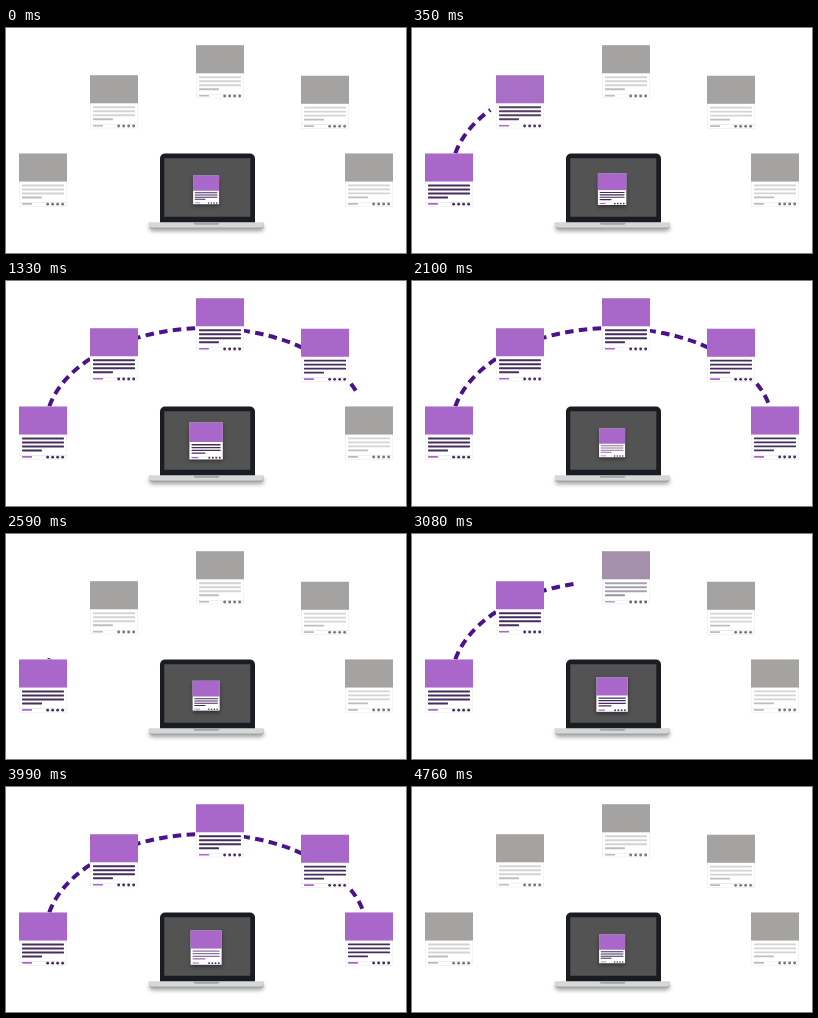
Animation, 400 px wide and 225 px high, one loop 4830 ms. Source, as an HTML page with a canvas:

```html
<!DOCTYPE html>
<html lang="en">
<head>
<meta charset="utf-8">
<title>Cards around a laptop</title>
<style>
html, body { margin: 0; width: 100%; height: 100%; overflow: hidden; background: #fff; }
canvas { display: block; width: 400px; height: 225px; }
</style>
</head>
<body>
<canvas id="stage"></canvas>
<script>
const LOOP = 4830, STEP = 70;
const canvas = document.getElementById('stage');
const ctx = canvas.getContext('2d');
const ratio = window.devicePixelRatio || 1;
canvas.width = 400 * ratio;
canvas.height = 225 * ratio;

// x, y and the time at which each card starts to gain colour
const CARDS = [
  [13, 125.5, -135], [84, 47.3, 178], [190, 17.3, 592], [295, 47.7, 965], [339, 125.4, 1335]
];
// time and angle of the tip of the dashed arc
const TIP = [[70, 0], [370, 0.76], [645, 1.336], [700, 1.43], [925, 1.82], [1330, 2.765], [1560, Math.PI]];

const GREY = { head: [165, 163, 161], line: [212, 212, 212], short: [190, 190, 190], label: [188, 188, 188], dot: [122, 122, 122] };
const PURPLE = { head: [169, 104, 201], line: [68, 46, 92], short: [68, 46, 92], label: [169, 104, 201], dot: [72, 46, 98] };
const PALE = { ...PURPLE, line: [140, 115, 160], short: [140, 115, 160] };

const ramp = (t, from, to) => Math.min(1, Math.max(0, (t - from) / (to - from)));
const ease = p => (1 - Math.cos(Math.PI * p)) / 2;
const mix = (a, b, p) => `rgb(${a.map((v, i) => Math.round(v + (b[i] - v) * p))})`;

function rect(x, y, w, h, fill, radius = 0) {
  ctx.fillStyle = fill;
  ctx.beginPath();
  ctx.roundRect(x, y, w, h, radius);
  ctx.fill();
}

function shadow(color, blur, dy) {
  ctx.shadowColor = color;
  ctx.shadowBlur = blur * ratio;
  ctx.shadowOffsetY = dy * ratio;
}

function card(x, y, scale, from, to, p) {
  const tone = part => mix(from[part], to[part], p);
  ctx.save();
  ctx.translate(x, y);
  ctx.scale(scale, scale);
  rect(0, 0, 48, 53, '#e9e9e9');
  shadow('transparent', 0, 0);
  rect(0.5, 28, 47, 24.5, '#fff');
  rect(0.5, 48.6, 47, 0.6, '#e6e6e6');
  rect(0, 0, 48, 28, tone('head'));
  for (let i = 0; i < 3; i++) rect(3, 31 + i * 4, 42, 1.9, tone('line'), 0.6);
  rect(3, 43, 20, 1.9, tone('short'), 0.6);
  rect(3, 49.6, 10, 1.7, tone('label'), 0.4);
  for (let i = 0; i < 4; i++) rect(27.2 + i * 5, 49.2, 2.9, 2.9, tone('dot'), 1.45);
  ctx.restore();
}

function arc(t) {
  let angle = 0;
  TIP.slice(1).forEach(([end, to], i) => {
    const [start, from] = TIP[i];
    angle += (to - from) * ramp(t, start, end);
  });
  if (!angle) return;
  ctx.strokeStyle = '#4c128c';
  ctx.lineWidth = 4;
  ctx.setLineDash([8.5, 5.3]);
  ctx.lineDashOffset = -8.2;
  ctx.beginPath();
  ctx.ellipse(200.5, 147, 161, 100, 0, Math.PI, Math.PI + angle);
  ctx.stroke();
}

function laptop(t) {
  ctx.save();
  shadow('rgba(0,0,0,.4)', 4, 2);
  rect(143, 196, 115, 5, '#a5a5a5', [0, 0, 4, 4]);
  ctx.restore();
  rect(154, 125.5, 95, 70, '#191d22', [5, 5, 1, 1]);
  rect(158.3, 130.3, 86, 58.4, '#535353');
  rect(142.5, 194.3, 115.5, 5.2, '#d6d7d7', [1, 1, 3, 3]);
  rect(187.5, 194.3, 26, 2.4, '#a3a4a5', [0, 0, 2, 2]);

  const grow = ease(ramp(t, -135, 1150)) - ease(ramp(t, 1150, 2125));
  const scale = (26 + 8 * grow) / 48;
  ctx.save();
  shadow('rgba(0,0,0,.4)', 4, 2);
  card(200.1 - 24 * scale, 161.9 - 2.1 * grow - 26.5 * scale, scale, PURPLE, PALE, ramp(t, 1340, 1540));
  ctx.restore();
}

// Time within a pass; the first pass opens faster and ends earlier
function passTime(t) {
  if (t < 350) return -140 + t * 1.4;
  if (t < 2170) return t;
  return t < 4760 ? t - 2430 : -300;
}

function draw(now) {
  const t = passTime(Math.floor((now % LOOP) / STEP) * STEP);
  ctx.setTransform(ratio, 0, 0, ratio, 0, 0);
  rect(0, 0, 400, 225, '#fff');
  arc(t);
  for (const [x, y, start] of CARDS) card(x, y, 1, GREY, PURPLE, ramp(t, start, start + 190));
  laptop(t);
}

let origin;
function tick(now) {
  origin ??= now;
  draw(now - origin);
  requestAnimationFrame(tick);
}
draw(0);
requestAnimationFrame(tick);
</script>
</body>
</html>
```
